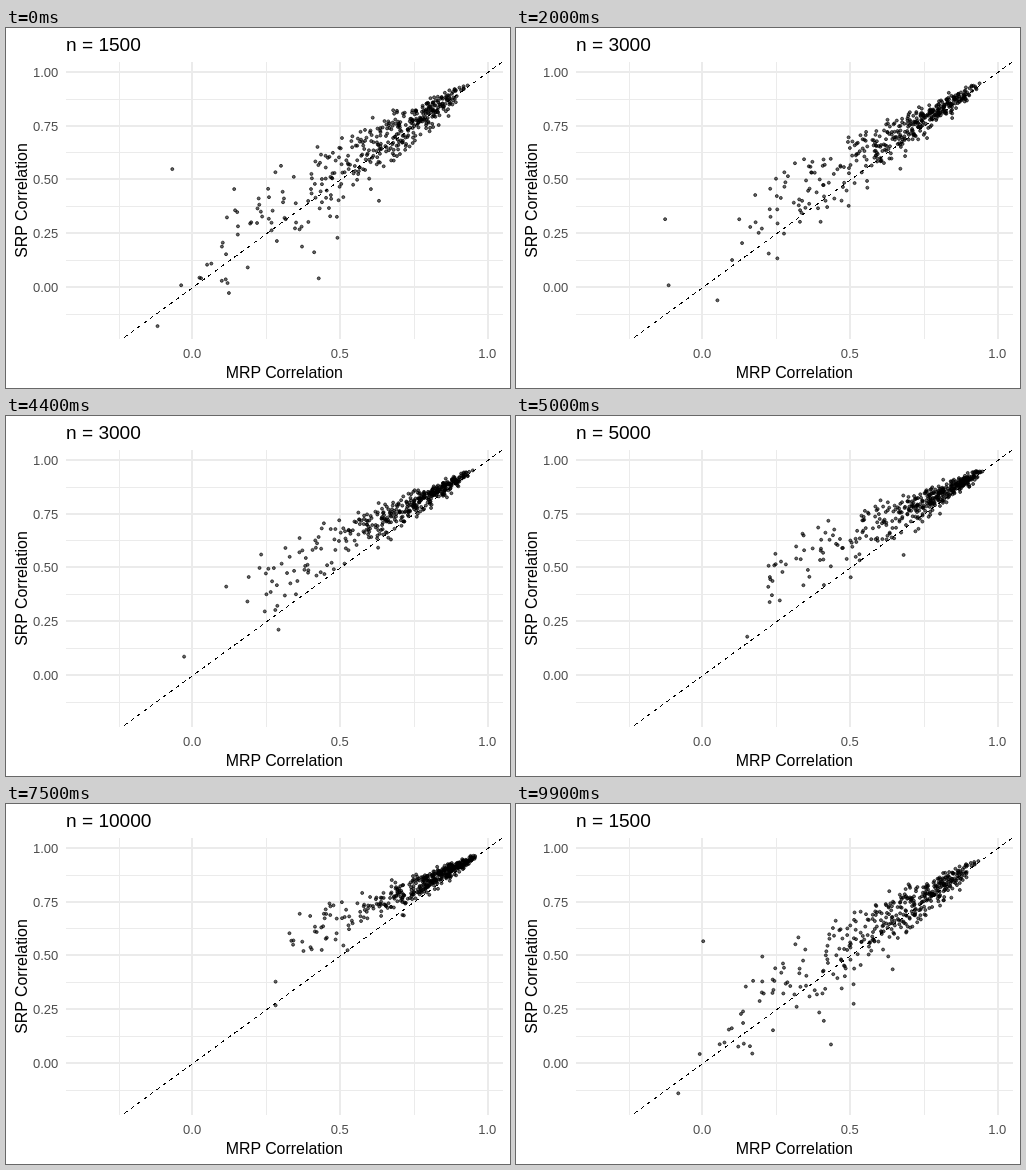
These frames come from a looping animation (504 px wide and 360 px high, 10000 ms). An HTML page:

```html
<!DOCTYPE html>
<html lang="en">
<head>
<meta charset="utf-8">
<title>Correlation by sample size</title>
<style>
  html, body { margin: 0; width: 100%; height: 100%; overflow: hidden; background: #fff; }
  svg { display: block; font-family: "Liberation Sans", Arial, sans-serif; }
  .grid { stroke: #ebebeb; }
  .identity { stroke: #000; stroke-dasharray: 4 4; shape-rendering: crispEdges; }
  .tick { font-size: 13px; fill: #4d4d4d; }
  .label { font-size: 15.9px; text-anchor: middle; }
  .points { fill: #000; fill-opacity: .6; stroke: #000; stroke-opacity: .65; stroke-width: 1; }
</style>
</head>
<body>
<svg width="504" height="360">
  <svg x="60" y="34" width="437" height="277" viewBox="60 34 437 277">
    <g class="grid"></g>
    <line class="identity"/>
    <g class="points"></g>
  </svg>
  <g class="ticks"></g>
  <text class="label" x="278.3" y="350">MRP Correlation</text>
  <text class="label" transform="translate(21 172.5) rotate(-90)">SRP Correlation</text>
  <text class="title" x="60" y="23" font-size="19.1"></text>
</svg>
<script>
const $ = selector => document.querySelector(selector);
const setAll = (node, attrs) => {
  for (const key in attrs) node.setAttribute(key, attrs[key]);
  return node;
};
const add = (parent, tag, attrs, text = '') => {
  const node = document.createElementNS('http://www.w3.org/2000/svg', tag);
  node.textContent = text;
  return parent.appendChild(setAll(node, attrs));
};
const px = v => 186.95 + 295.1 * v;
const py = v => 259.4 - 215.1 * v;

// Grid lines sit on whole pixels: major lines 2 px wide, minor lines 1 px
const gridLine = (axis, position, width) => {
  const at = Math.floor(position) + (width === 1 ? .5 : 0);
  const ends = axis === 'x' ? { x1: at, x2: at, y1: 34, y2: 311 } : { y1: at, y2: at, x1: 60, x2: 497 };
  add($('.grid'), 'line', { ...ends, 'stroke-width': width });
};
for (let v = -.25; v < 1; v += .5) gridLine('x', px(v), 1);
for (let v = -.125; v < 1; v += .25) gridLine('y', py(v), 1);
for (let v = 0; v <= 1; v += .5) {
  gridLine('x', px(v), 2);
  add($('.ticks'), 'text', { class: 'tick', x: px(v) - .8, y: 330, 'text-anchor': 'middle' }, v.toFixed(1));
}
for (let v = 0; v <= 1; v += .25) {
  gridLine('y', py(v), 2);
  add($('.ticks'), 'text', { class: 'tick', x: 52.3, y: Math.floor(py(v)) + 5, 'text-anchor': 'end' }, v.toFixed(2));
}
setAll($('.identity'), { x1: px(-.43), y1: py(-.43), x2: px(1.06), y2: py(1.06) });

// Per sample size: 1 - x is log-normal, 1 - y follows scale * (1 - x) ^ power with noise
const STATES = [
  { n: 1500, median: .32, spread: .56, scale: .92, power: 1, noise: .2 },
  { n: 3000, median: .27, spread: .6, scale: .74, power: .92, noise: .17 },
  { n: 5000, median: .235, spread: .6, scale: .68, power: .9, noise: .17 },
  { n: 10000, median: .2, spread: .62, scale: .62, power: .88, noise: .17 }
];

let seed = 7;
const random = () => {
  seed = seed + 0x6D2B79F5 | 0;
  let r = Math.imul(seed ^ seed >>> 15, 1 | seed);
  r = r + Math.imul(r ^ r >>> 7, 61 | r) ^ r;
  return ((r ^ r >>> 14) >>> 0) / 4294967296;
};
const normal = () => 2 * (random() + random() + random() - 1.5);
const blend = (shared, r) => r * shared + Math.sqrt(1 - r * r) * normal();

// One point's [x, y] in every state; shared level and offset keep its rank similar
function cloudPoint() {
  const level = normal(), offset = normal();
  return STATES.map(({ median, spread, scale, power, noise }) => {
    let z = blend(level, .92);
    if (z > 2) z = 4 - z;
    const dx = median * Math.exp(spread * z);
    const dy = scale * dx ** power * Math.exp(noise * blend(offset, .65));
    return [1 - dx, 1 - dy];
  });
}

// The few extreme points outside the cloud
const extremes = [
  [[-.12, -.18], [.19, .04], [.41, .42], [.28, .27]],
  [[-.04, .01], [-.18, .01], [.15, .18], [.28, .38]],
  [[-.07, .55], [.63, .6], [.72, .67], [.71, .75]],
  [[.15, .35], [-.36, .29], [.68, .56], [.71, .69]]
];
const points = [...extremes, ...Array.from({ length: 400 }, cloudPoint)];
const dots = points.map(() => add($('.points'), 'circle', { r: 1.5 }));

const HOLD = 1500, SPAN = 2500, STEP = 100, STEPS = 11;
function draw() {
  const time = performance.now() % (SPAN * STATES.length);
  const from = Math.floor(time / SPAN), to = (from + 1) % STATES.length;
  const moving = time % SPAN - HOLD;
  const p = moving < 0 ? 0 : (Math.floor(moving / STEP) + 1) / STEPS;
  points.forEach((states, i) => {
    const [x, y] = states[from].map((v, axis) => v + (states[to][axis] - v) * p);
    setAll(dots[i], { cx: px(x), cy: py(y) });
  });
  $('.title').textContent = 'n = ' + STATES[p < .5 ? from : to].n;
  requestAnimationFrame(draw);
}
draw();
</script>
</body>
</html>
```
